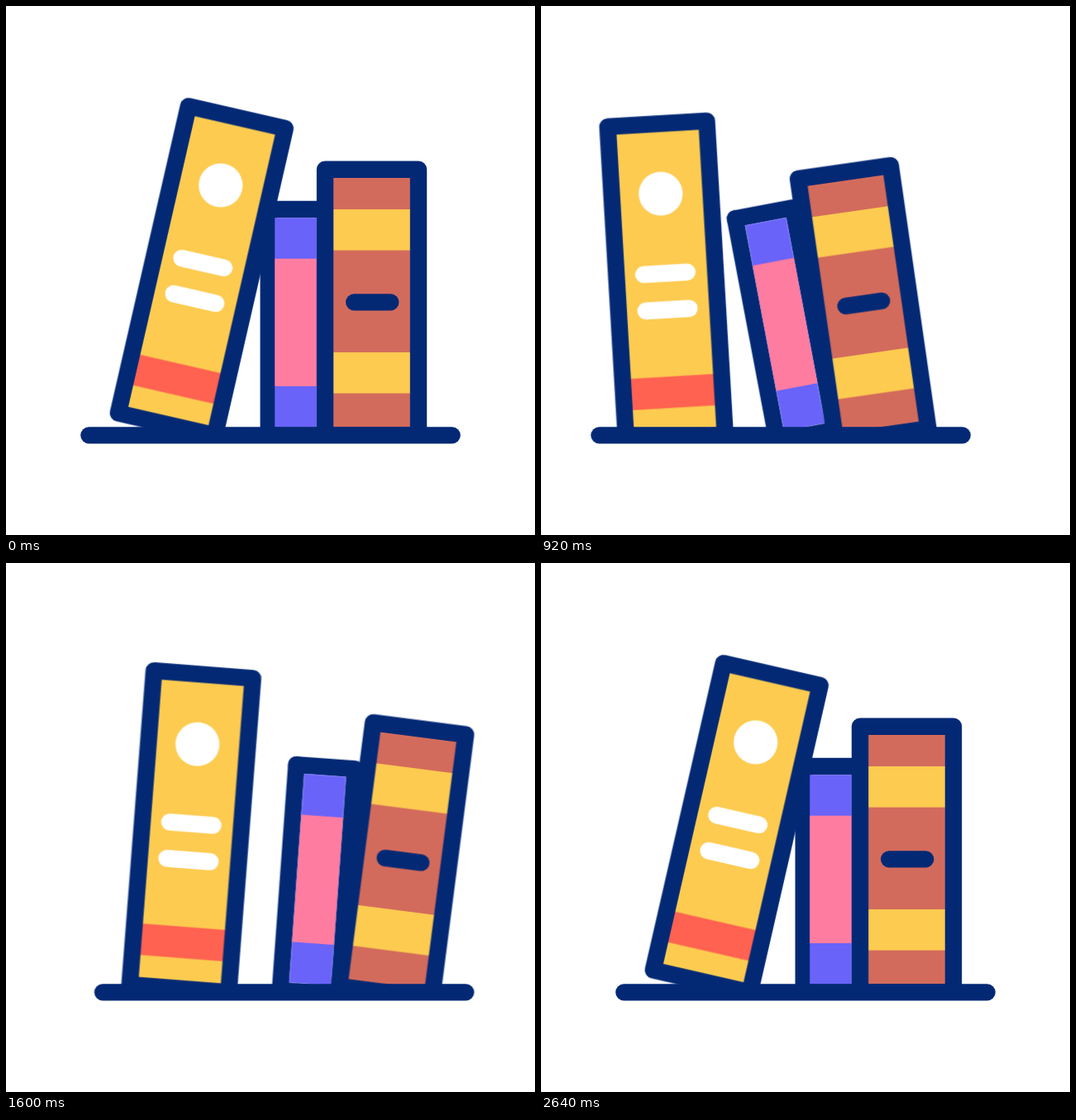
Animation, 640 px wide and 640 px high, one loop 3 s. Source, as an HTML page:

```html
<!DOCTYPE html>
<html lang="en">
<head>
<meta charset="utf-8">
<title>Books on a sliding shelf</title>
<style>
  html, body { margin: 0; width: 100%; height: 100%; overflow: hidden; background: #fff; }
  svg { display: block; width: 100vw; height: 100vh; }

  .line { fill: none; stroke: #032975; stroke-width: 20.4; stroke-linecap: round; stroke-linejoin: round; }
  .label { fill: none; stroke: #fff; stroke-width: 20.6; stroke-linecap: round; }
  .gold { fill: #fdcb50; }
  .coral { fill: #ff6250; }
  .violet { fill: #6963f9; }
  .pink { fill: #ff7ca1; }
  .brick { fill: #d36b5c; }

  .scene, .tall, .slim, .wide, .side {
    animation: 3s cubic-bezier(.37, 0, .63, 1) infinite;
  }
  .scene { animation-name: slide; }
  .tall { animation-name: tall; transform-origin: 252.7px 519.4px; }
  .slim { animation-name: slim; transform-origin: 350.5px 519.4px; }
  .wide { animation-name: wide; transform-origin: 442.5px 519.4px; }
  .side { animation-name: side; }

  @keyframes slide {
    0%, 7.17% { transform: translateX(0); }
    24% { transform: translateX(-57px); }
    43.83% { transform: translateX(49.5px); }
    64.33% { transform: translateX(-24.4px); }
    85.17%, 100% { transform: translateX(0); }
  }
  @keyframes tall {
    0%, 7.17% { transform: rotate(12.9deg); }
    24.83% { transform: rotate(-8.2deg); }
    43.5% { transform: rotate(13.5deg); }
    65.5% { transform: rotate(-8.2deg); animation-timing-function: cubic-bezier(.3, .2, .55, 1); }
    88%, 100% { transform: rotate(12.9deg); }
  }
  @keyframes slim {
    0%, 10.33% { transform: rotate(0deg); }
    27.67% { transform: rotate(-11.5deg); }
    49.53% { transform: rotate(6deg); }
    67.5% { transform: rotate(-11.5deg); }
    88%, 100% { transform: rotate(0deg); }
  }
  @keyframes wide {
    0%, 10.33% { transform: rotate(0deg); }
    27.67% { transform: rotate(-9deg); }
    49.53% { transform: rotate(9.3deg); }
    67.5% { transform: rotate(-9deg); }
    88%, 100% { transform: rotate(0deg); }
  }
  /* The slim book's left edge is a little thinner at rest. */
  @keyframes side {
    0%, 10.33% { transform: translateX(2.6px); }
    13%, 85% { transform: translateX(0); }
    88%, 100% { transform: translateX(2.6px); }
  }
</style>
</head>
<body>
<svg viewBox="0 0 640 640">
  <clipPath id="above"><rect x="-100" width="840" height="525"/></clipPath>
  <g class="scene">
    <g clip-path="url(#above)">
      <g class="slim">
        <path class="line" d="M315 519.4H386V246H315"/>
        <path class="line side" d="M315 246V519.4"/>
        <rect class="violet" x="325.2" y="256.2" width="50.6" height="253"/>
        <rect class="pink" x="325.2" y="305.7" width="50.6" height="154.3"/>
      </g>
      <g class="wide">
        <rect class="brick" x="386" y="197.7" width="113" height="321.7"/>
        <rect class="gold" x="386" y="246" width="113" height="49.6"/>
        <rect class="gold" x="386" y="419" width="113" height="49.6"/>
        <rect class="line" x="386" y="197.7" width="113" height="321.7"/>
        <path class="line" d="M421.2 358.4H465.2"/>
      </g>
      <g class="tall">
        <rect class="gold" x="132.7" y="138.4" width="120" height="381"/>
        <rect class="coral" x="132.7" y="444.5" width="120" height="38"/>
        <rect class="line" x="132.7" y="138.4" width="120" height="381"/>
        <circle cx="192" cy="223" r="26.6" fill="#fff"/>
        <path class="label" d="M165.7 319.5H218.3M165.7 363.6H218.3"/>
      </g>
    </g>
    <path class="line" d="M100.4 519.4H539.6"/>
  </g>
</svg>
</body>
</html>
```
